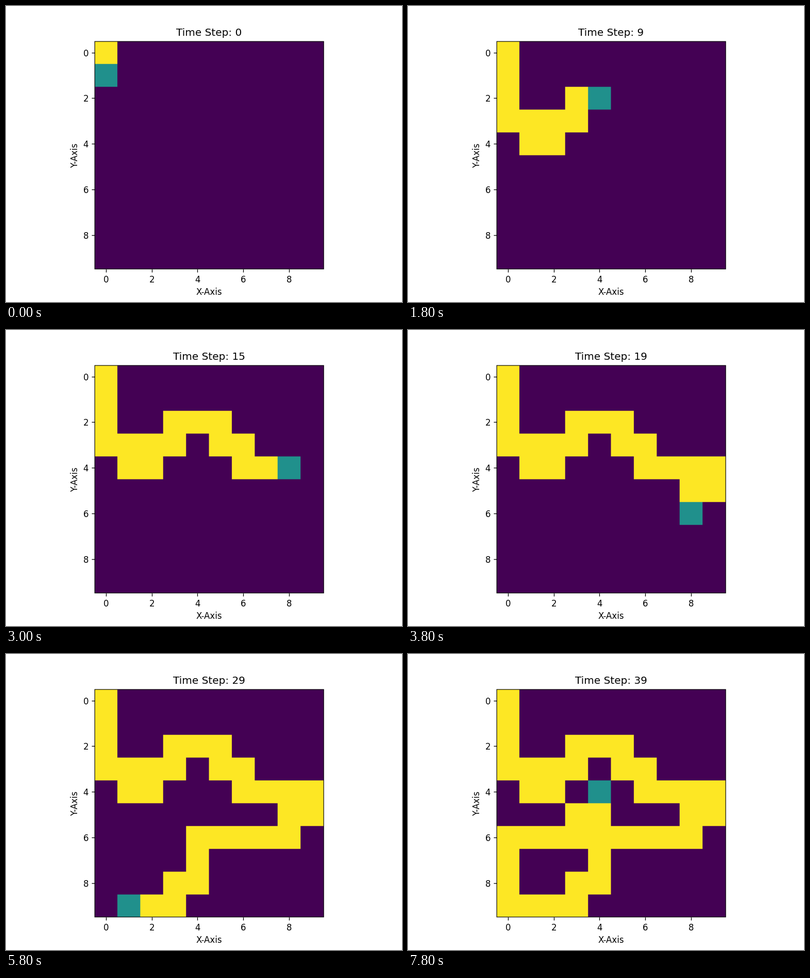
Recreate the animation shown at these times as a matplotlib script. Size 768 by 576 pixels, loop 8 s.

```python
import numpy as np
import matplotlib.pyplot as plt
from matplotlib.animation import FuncAnimation

SIZE, CELL = 10, 37          # cells per side, panel pixels per cell
ZOOM = 1.2                   # the panel is drawn coarse and scaled up softly
LEFT, RIGHT, TOP, BOTTOM = 3, 2, 2, 3   # white margin of the panel
MOVES = "DDDRDRURURRDRDRRRDLDLLLLDDLDLLLUUURRRURU"
STEP = {"U": (-1, 0), "D": (1, 0), "L": (0, -1), "R": (0, 1)}
EMPTY, HEAD, VISITED = range(3)
COLORS = plt.cm.viridis([0.0, 0.5, 1.0], bytes=True)[:, :3]

# Cells of the walk, starting in the top left corner
path = np.cumsum([(0, 0)] + [STEP[m] for m in MOVES], axis=0)


def grid_at(step):
    grid = np.full((SIZE, SIZE), EMPTY)
    trail = path[:step + 1]
    grid[trail[:, 0], trail[:, 1]] = VISITED
    grid[tuple(path[step + 1])] = HEAD
    return grid


def panel_at(step):
    cells = COLORS[grid_at(step)].repeat(CELL, axis=0).repeat(CELL, axis=1)
    panel = np.pad(cells, ((TOP, BOTTOM), (LEFT, RIGHT), (0, 0)),
                   constant_values=255)
    x0, x1 = LEFT, LEFT + SIZE * CELL
    y0, y1 = TOP, TOP + SIZE * CELL - 1
    panel[y0:y1 + 1, [x0, x1]] = 0
    panel[[y0, y1], x0:x1 + 1] = 0
    return panel


fig = plt.figure(figsize=(6.4, 4.8), dpi=120)
side = SIZE * CELL * ZOOM
ax = fig.add_axes([171.6 / 768, 63.6 / 576, side / 768, side / 576])

# Margins in cell units, a hair short so the size never rounds up
left, right, top, bottom = (m / CELL - 1e-6
                            for m in (LEFT, RIGHT, TOP, BOTTOM))
low, high = -0.5, SIZE - 0.5
image = ax.imshow(panel_at(0), aspect="auto", interpolation="bilinear",
                  extent=(low - left, high + right, high + bottom, low - top))
image.set_clip_on(False)
ax.set(xlim=(low, high), ylim=(high, low))
ax.set_xticks(range(0, SIZE, 2))
ax.set_yticks(range(0, SIZE, 2))
ax.spines[:].set_visible(False)
title = ax.set_title("Time Step: 0")
ax.set_xlabel("X-Axis", labelpad=3.4)
ax.set_ylabel("Y-Axis")


def update(step):
    image.set_data(panel_at(step))
    title.set_text(f"Time Step: {step}")
    return image, title


anim = FuncAnimation(fig, update, frames=len(MOVES), interval=200,
                     repeat=True, repeat_delay=0, blit=False)
plt.show()
```
